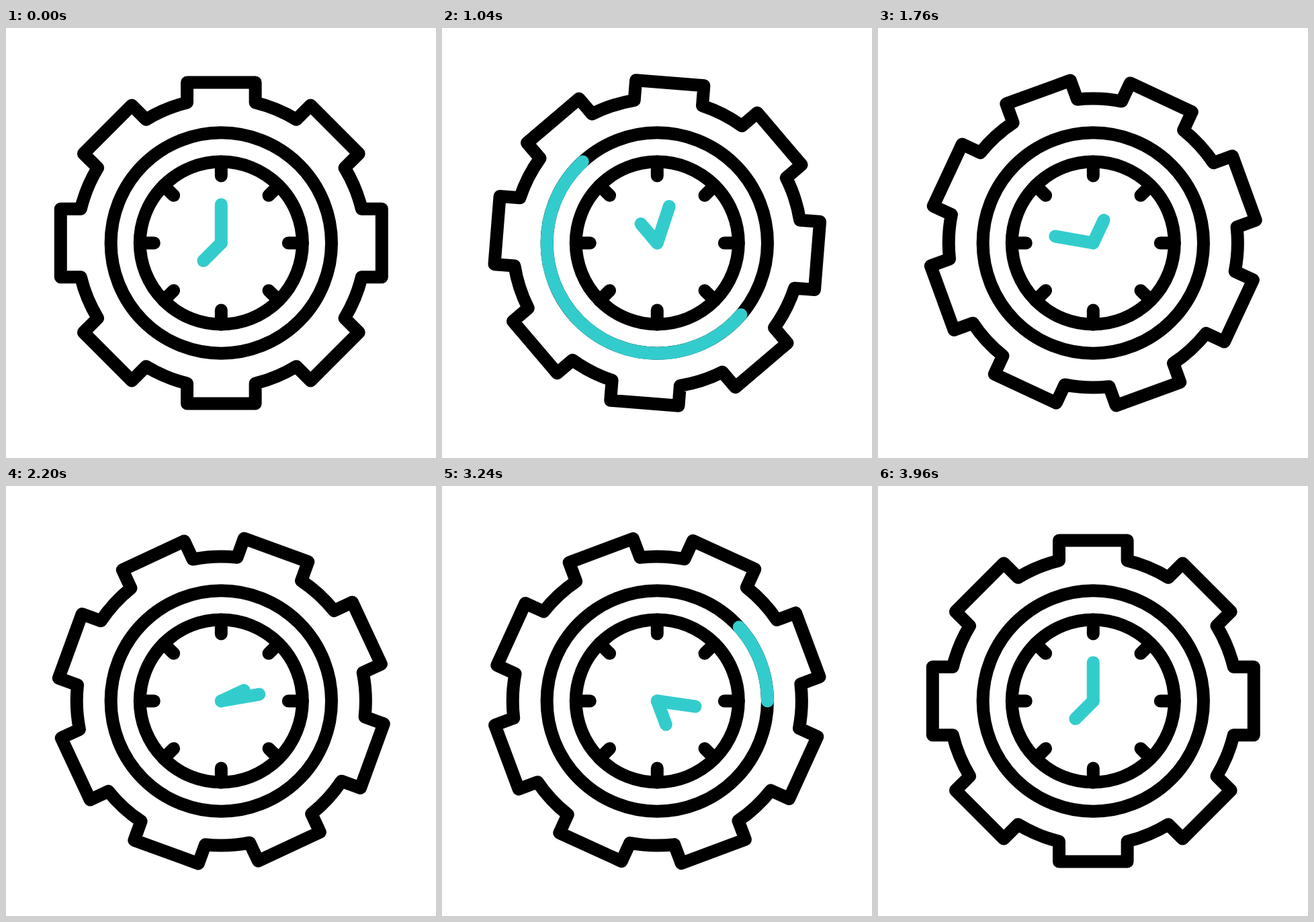
Write an HTML page that moves like this. It is 640 px wide and 640 px high and loops after 4000 ms.

```html
<!DOCTYPE html>
<html lang="en">
<head>
<meta charset="utf-8">
<title>Gear clock</title>
<style>
  html, body { margin: 0; height: 100%; overflow: hidden; background: #fff; }
  svg { display: block; width: 100%; height: 100%; }
  g { fill: none; stroke-width: 19; stroke-linecap: round; stroke-linejoin: round; }
</style>
</head>
<body>
<svg viewBox="0 0 640 640">
  <g transform="translate(320.3 320)" stroke="#000">
    <path id="gear"/>
    <circle r="164.2"/>
    <path id="arc" stroke="#3cc"/>
    <circle r="121"/>
    <path id="ticks"/>
    <path id="minute" d="M0 0V-57.3" stroke="#3cc"/>
    <path id="hour" d="M0 0V-37.4" stroke="#3cc"/>
  </g>
</svg>
<script>
const LOOP = 4000, STEP = 40, TURN = LOOP - STEP;
const RING = 164.2;
const SWEEP_STARTS = [606, 2380], SWEEP_TIME = 737, TAIL_DELAY = 280;

const [gear, arc, ticks, minute, hour] =
  ['gear', 'arc', 'ticks', 'minute', 'hour'].map(id => document.getElementById(id));

// Rotates a point clockwise around the centre.
function turned(x, y, degrees) {
  const a = degrees * Math.PI / 180, c = Math.cos(a), s = Math.sin(a);
  return `${(x * c - y * s).toFixed(2)} ${(x * s + y * c).toFixed(2)}`;
}

function gearPath() {
  const half = 50.8, root = -209, tip = -239;
  const radius = Math.hypot(half, root);
  let d = '';
  for (let a = 0; a < 360; a += 45) {
    d += a ? `A${radius} ${radius} 0 0 1 ` : 'M';
    d += [[-half, root], [-half, tip], [half, tip], [half, root]]
      .map(([x, y]) => turned(x, y, a)).join('L');
  }
  return d + `A${radius} ${radius} 0 0 1 ${turned(-half, root, 0)}Z`;
}

function tickPath() {
  let d = '';
  for (let a = 0; a < 360; a += 45) d += `M${turned(0, -100, a)}L${turned(0, -121, a)}`;
  return d;
}

function ease(p) {
  p = Math.min(1, Math.max(0, p));
  return p * p * (3 - 2 * p);
}

function arcPath(t) {
  for (const start of SWEEP_STARTS) {
    const head = 360 * ease((t - start) / SWEEP_TIME);
    const tail = 360 * ease((t - start - TAIL_DELAY) / SWEEP_TIME);
    if (head > tail) {
      const large = head - tail > 180 ? 1 : 0;
      return `M${turned(RING, 0, tail)}A${RING} ${RING} 0 ${large} 1 ${turned(RING, 0, head)}`;
    }
  }
  return '';
}

function rotate(el, degrees) {
  el.setAttribute('transform', `rotate(${degrees})`);
}

function draw(now) {
  const t = Math.floor(now % LOOP / STEP) * STEP;
  const angle = 360 * t / TURN;
  rotate(gear, angle);
  rotate(hour, 225 + angle);
  rotate(minute, 4 * angle);
  arc.setAttribute('d', arcPath(t));
}

gear.setAttribute('d', gearPath());
ticks.setAttribute('d', tickPath());

let begin;
function frame() {
  const now = performance.now();
  begin ??= now;
  draw(now - begin);
  requestAnimationFrame(frame);
}
draw(0);
requestAnimationFrame(frame);
</script>
</body>
</html>
```
